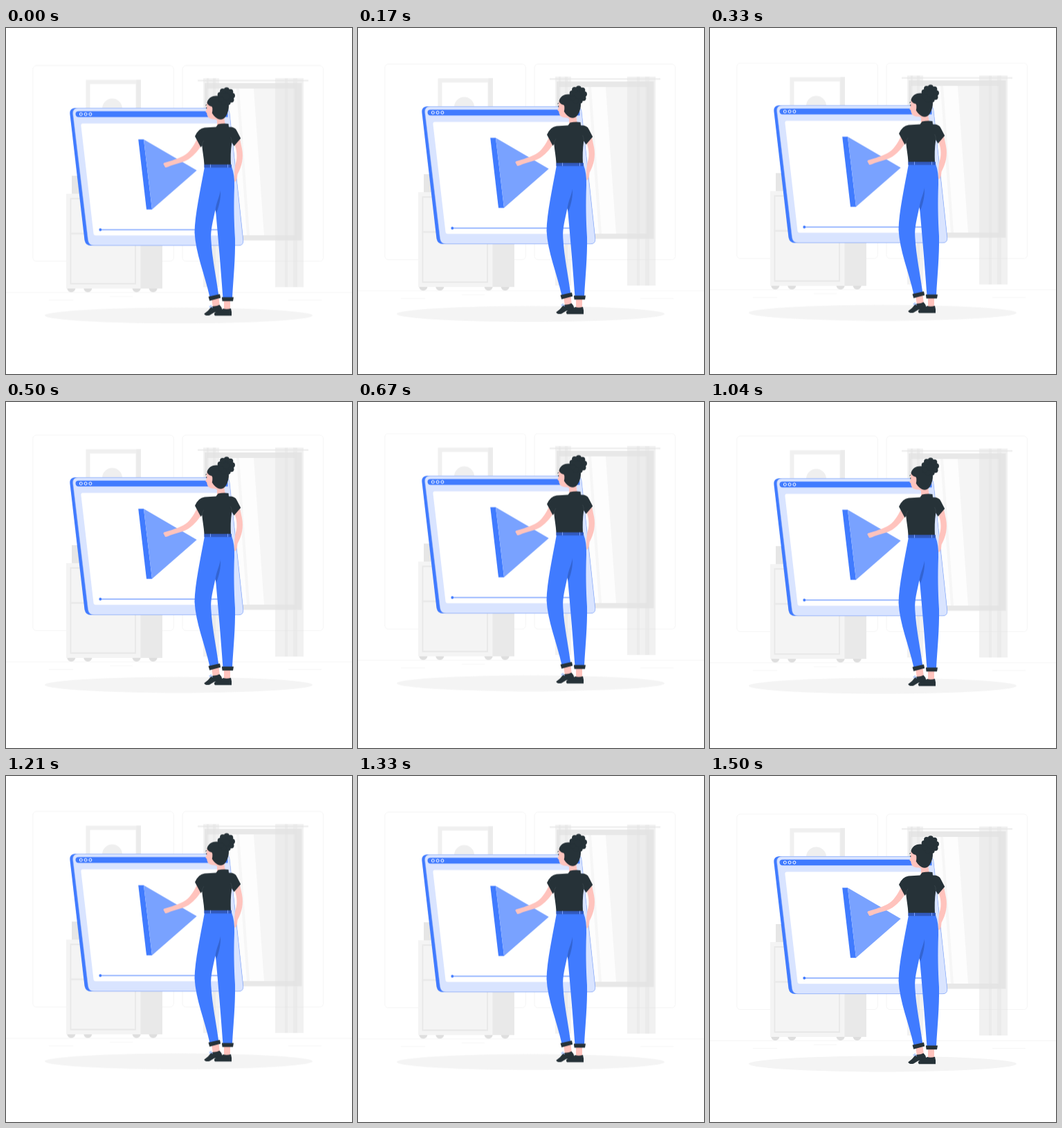
Animation, 500 px wide and 500 px high, one loop 1540 ms. Source, as an HTML page:

```html
<!DOCTYPE html>
<html lang="en">
<head>
<meta charset="utf-8">
<title>Video player</title>
<style>
  html, body { margin: 0; width: 100%; height: 100%; overflow: hidden; background: #fff; }
  svg { display: block; width: 100vw; height: 100vh; }
  .blue { fill: #407bff; }
  .dark { fill: #263238; }
  .skin { fill: #ffc3bd; }
  .pale { fill: #d9e4ff; }
  .hair-line { fill: none; stroke: #efefef; stroke-width: .6; }
</style>
</head>
<body>
<svg viewBox="0 0 500 500">
  <g id="scene">
    <!-- room -->
    <g class="hair-line">
      <rect x="38.8" y="55" width="203.5" height="282.5" rx="5"/>
      <rect x="255" y="55" width="203.5" height="282.5" rx="5"/>
      <path d="M0 382.6H500M408 393.7H456M150 388.4H183M62 393.7H97"/>
    </g>

    <!-- picture -->
    <path fill="#f0f0f0" d="M115.5 75.5H195V150H115.5z"/>
    <path fill="#ebebeb" d="M188.5 75.5H195V150H188.5z"/>
    <path fill="#fff" d="M121.5 81.5H187.5V150H121.5z"/>
    <circle cx="153.5" cy="117" r="14.5" fill="#efefef"/>

    <!-- cabinet -->
    <path fill="#e6e6e6" d="M95 214H150V241H95z"/>
    <g id="feet" fill="#dedede"></g>
    <path fill="#e9e9e9" d="M190 240H226V377H190z"/>
    <path fill="#f4f4f4" d="M87 240H194.5V377H87z"/>
    <path fill="none" stroke="#e8e8e8" stroke-width="1.8" d="M93.4 247H187V370H93.4zM93.4 297.5H187"/>

    <!-- window -->
    <path fill="#e8e8e8" d="M287 80H427.5V307.5H287z"/>
    <path fill="#f5f5f5" d="M291 88H417V300H291z"/>
    <path fill="#fdfdfd" d="M291 88H358L373 300H291z"/>
    <path fill="#f6f6f6" d="M333 88H337L352 300H348z"/>
    <path fill="#ececec" d="M277 75.5H437V77.6H277z"/>
    <g id="drapes" fill="#e2e2e2"></g>

    <ellipse cx="249.5" cy="416" rx="193.5" ry="11.4" fill="#f4f4f4"/>

    <!-- player -->
    <path class="blue" d="M100 116H315Q322 116 323 123L343 308Q343 315 336 315H123Q115 315 113.5 307L92.3 124Q92 116.5 100 116z"/>
    <path class="pale" stroke="#8aabf5" stroke-width=".5" d="M104 116.3H316Q322 116.3 323 123L342.8 308Q343 314.8 336 314.8H127Q119.500 314.800 118.500 307L96.600 124Q96.500 116.500 104 116.300z"/>
    <path class="blue" d="M105 120.800H316Q320 120.800 320.500 125V129.300H105Q101 129.300 100.500 125Q100.500 120.800 105 120.800z"/>
    <path fill="#fff" d="M111 138.600H310Q312.700 138.600 313 141L329.800 297Q330 300.300 327 300.300H129.500Q126.800 300.300 126.500 297.500L108.400 141.500Q108.300 138.600 111 138.600z"/>
    <g id="dots" fill="none" stroke="#fff" stroke-width="1"></g>
    <path stroke="#7ea4ff" stroke-width="1.500" d="M136 292H318"/>
    <circle class="blue" cx="136.300" cy="292" r="2"/>
    <path class="blue" d="M191.200 161.600H199L211 262.800H203z"/>
    <path fill="#79a2ff" d="M199 161.600L275.700 206.200L211 262.800z"/>

    <!-- legs -->
    <path class="skin" d="M297 392L307.500 390L309 404H299zM315 394H324V408H315z"/>
    <path class="dark" d="M286.300 413.500Q293 409 296.500 403.500L300 402.500Q304 403 308.500 400.500Q311.500 403 312.500 408L306 411.500H301L294 415.800Q288 417 286.300 413.500z"/>
    <path class="dark" d="M301 413Q303 410.500 308 409.500L314 406Q319 407.500 325 405.800Q326.600 411 326 416.200H302Q300.500 415 301 413z"/>
    <path fill="none" stroke="#9dbbff" stroke-width=".9" d="M294 405L296 401L298.500 404.500L293.500 402.500"/>
    <path class="blue" d="M287 201H326Q330.500 212 330 230C329 258 329.500 280 331 305C331.500 335 328.500 362 327 390.500H313.500C311 355 308 320 303.500 270L302.500 263C299 280 295.500 292 296.300 306C298 335 304 361 307.300 387L294.500 389.500C287 356 274 326 272.500 296C273 270 281 234 287 201z"/>
    <path fill="#3364d2" d="M310 235.500C308 246 304 252 302.500 264L304.500 267C308 257 310.500 247 310 235.500z"/>
    <path class="dark" d="M292.500 388.700L309 385L310.200 390.600L294.200 394.800zM311.800 389.600H329L328 395.200H312.600z"/>

    <!-- arms -->
    <path class="skin" d="M276 161C271 171 265 181 256 185.500C250 188.500 245 190 240 192L229 195.200Q226.500 196.200 228 198L230 201.700Q232 202.700 238 199.500C246 196.500 256 195 264 190C273 184 279 175 282.500 170z"/>
    <path class="skin" d="M330 167C333.500 177 334.500 186 332.500 194C330 203 330 209 330 222.500L332.500 222Q334.500 217 334.500 212C341 200 343.500 188 341 175L338 161z"/>

    <!-- head -->
    <path class="skin" d="M291.500 106C289.500 110 290 115 290 118L288.300 121.500L290.300 123.500C290.500 129 294 133 302.500 132.500L305 134V142H317L315 128L306 106z"/>
    <path class="dark" d="M303.500 143.500L306.500 139.600Q314 138 321.500 139L322 143.500Q331 143 333.500 149L339.200 160L329.500 171.300L326.300 166C324.500 178 324.500 188 325 198.300H286.500C286 188 284 179 283.300 170.500L281.500 173L273 157Q278 145.500 287 144.500z"/>
    <path fill="none" stroke="#455157" stroke-width=".5" d="M283.300 170.500Q283.500 166 286 163M326.300 166Q326.500 161 324.500 158"/>
    <path fill="#3159bd" d="M286.300 197.800H326V202.200H286.300z"/>
    <path fill="#7ea4ff" d="M295 197.800H296V202.200H295zM320 197.800H321V202.200H320z"/>
    <path class="dark" d="M290.500 109C291 103 297 98 305 98.500C314 98 321.500 104 322 113C322 122 317 133 310.500 132.800C304 132.500 300 127 297.500 123V114Q293 113.500 290.500 109z"/>
    <g id="bun" class="dark"></g>
    <path class="skin" d="M298.300 116Q296.500 112.500 294 115.500Q292.700 120 295.500 124Q298 124.500 298.300 120z"/>
    <path stroke="#263238" stroke-width=".9" d="M289.800 115V117.200M288.300 112.300L290.300 111.300"/>
  </g>
</svg>
<script>
  const $ = id => document.getElementById(id);

  function add(parent, tag, attrs) {
    const el = document.createElementNS('http://www.w3.org/2000/svg', tag);
    for (const key in attrs) el.setAttribute(key, attrs[key]);
    $(parent).append(el);
  }

  for (const x of [94.3, 118.3, 188.600, 212.600])
    add('feet', 'circle', { cx: x, cy: 376, r: 6.200 });

  for (let i = 0; i < 3; i++)
    add('dots', 'ellipse', { cx: 108.300 + i * 6.800, cy: 125, rx: 2, ry: 2.100 });

  for (const [x, width, opacity] of [
    [285, 23, .45], [290, 3, .4], [299, 4, .4],
    [389, 41, .48], [403, 4, .4], [415, 6, .35]
  ]) add('drapes', 'rect', { x, y: 73, width, height: 302, opacity });

  // scalloped outline of curls
  add('bun', 'circle', { cx: 318.200, cy: 99.300, r: 9.500 });
  for (let i = 0; i < 9; i++) {
    const a = i * Math.PI * 2 / 9 - 1.500;
    add('bun', 'circle', { cx: 318.200 + 8.800 * Math.cos(a), cy: 99.300 + 9 * Math.sin(a), r: 4 });
  }

  // floating: 17 ticks up, 20 ticks down, constant speed
  const rise = y => `translateY(${y}px)`;
  $('scene').animate([
    { offset: 0, transform: rise(-.53), easing: 'steps(17, jump-end)' },
    { offset: 17 / 37, transform: rise(-10), easing: 'steps(20, jump-none)' },
    { offset: 1, transform: rise(0) }
  ], { duration: 1540, iterations: Infinity });
</script>
</body>
</html>
```
